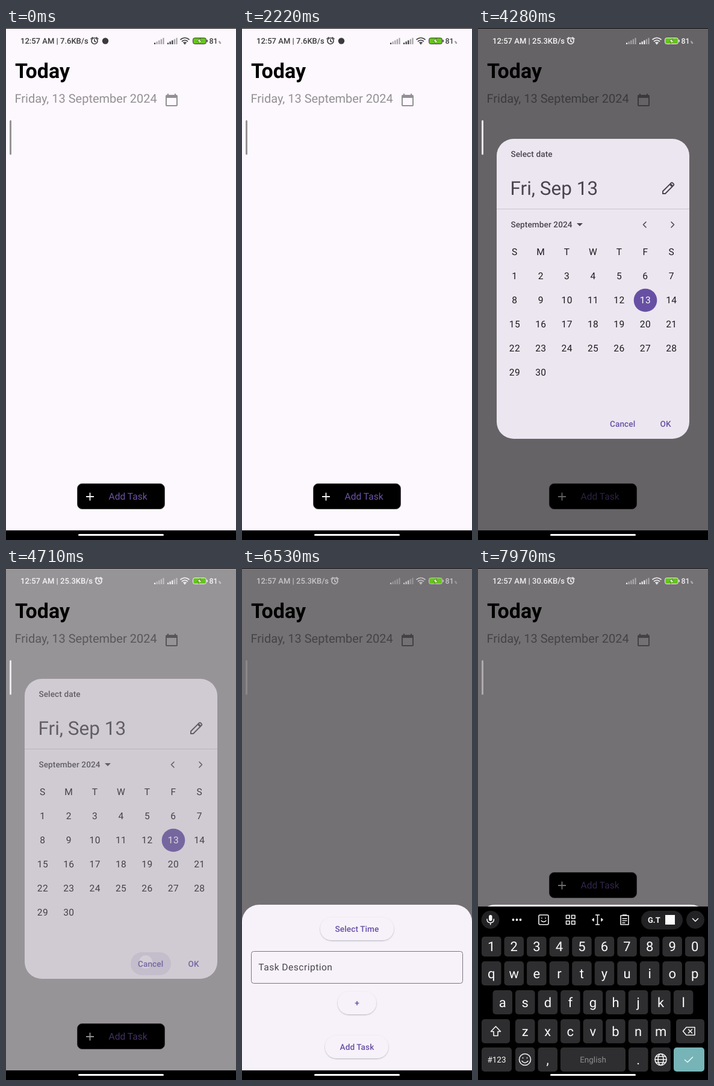
An HTML page for the animation above (8 s loop, 382x850 px).

```html
<!DOCTYPE html>
<html lang="en">
<head>
<meta charset="utf-8">
<title>Task planner</title>
<style>
html, body { margin: 0; width: 100%; height: 100%; overflow: hidden; background: #fdf8fd; }
svg { display: block; width: 382px; height: 850px; font-family: Roboto, sans-serif; text-rendering: geometricPrecision; }
.mid { text-anchor: middle; }
.label { font-size: 13.6px; font-weight: 500; letter-spacing: .1px; }
.line { fill: none; stroke: currentColor; stroke-width: 1.6; stroke-linecap: round; stroke-linejoin: round; }

#status, #edge, #speedA, #speedB, #speedC, #alarm, #dot,
#dialogScrim, #dialog, #press, #tapDate, #tapCancel, #tapAdd,
#sheetScrim, #sheet, #keyboard, #addButton { animation: 8s linear infinite both; }

#status, #edge, #speedA, #speedB, #speedC, #alarm, #dot { animation-timing-function: step-end; }
#status { animation-name: status; }
@keyframes status {
  0% { color: #3b3a3c } 49.5% { color: #f5f4f5 } 60% { color: #3b3a3c }
  77% { color: #c8c5c8 } 96.5%, 100% { color: #efedef }
}
#edge { animation-name: edge; }
@keyframes edge {
  0% { fill: #969298 } 49.5% { fill: #ebe8ec } 60% { fill: #969298 }
  77% { fill: #8b888c } 96.5%, 100% { fill: #aeaab0 }
}
#speedA, #dot { animation-name: speedA; }
@keyframes speedA { 0% { opacity: 1 } 48.125%, 100% { opacity: 0 } }
#speedB { animation-name: speedB; }
@keyframes speedB { 0% { opacity: 0 } 48.125% { opacity: 1 } 98.125%, 100% { opacity: 0 } }
#speedC { animation-name: speedC; }
@keyframes speedC { 0% { opacity: 0 } 98.125%, 100% { opacity: 1 } }
#alarm { animation-name: alarm; }
@keyframes alarm { 0% { transform: none } 48.125%, 100% { transform: translateX(7px) } }

#dialogScrim, #dialog { animation-name: dialog; }
@keyframes dialog {
  0%, 49% { opacity: 0 } 51.5%, 58.1% { opacity: 1 } 58.875% { opacity: .68 } 60.5%, 100% { opacity: 0 }
}
#press { animation-name: press; }
@keyframes press { 0%, 57% { opacity: 0 } 58%, 100% { opacity: .14 } }
#tapDate { animation-name: tapDate; }
@keyframes tapDate { 0%, 45.4% { opacity: 0 } 45.5%, 46.3% { opacity: .6 } 47.2%, 100% { opacity: 0 } }
#tapCancel { animation-name: tapCancel; }
@keyframes tapCancel { 0%, 56.9% { opacity: 0 } 57%, 58.9% { opacity: .55 } 59.8%, 100% { opacity: 0 } }
#tapAdd { animation-name: tapAdd; }
@keyframes tapAdd { 0%, 73.4% { opacity: 0 } 73.5%, 74.6% { opacity: .85 } 75.6%, 100% { opacity: 0 } }

#sheetScrim { animation-name: sheetScrim; }
@keyframes sheetScrim {
  0%, 76.5% { opacity: 0; animation-timing-function: cubic-bezier(.4, 0, .2, 1) }
  80.3%, 100% { opacity: 1 }
}
#sheet { animation-name: sheet; }
@keyframes sheet {
  0%, 76.5% { transform: translateY(292px); animation-timing-function: cubic-bezier(.4, 0, .2, 1) }
  80.3%, 100% { transform: none }
}
#keyboard { animation-name: keyboard; }
@keyframes keyboard {
  0%, 96.5% { transform: translateY(290px); animation-timing-function: cubic-bezier(.35, 0, .4, 1) }
  99.6%, 100% { transform: none }
}
#addButton { animation-name: addButton; }
@keyframes addButton {
  0%, 96.5% { transform: none; animation-timing-function: cubic-bezier(.35, 0, .4, 1) }
  99.6%, 100% { transform: translateY(-251px) }
}
</style>
</head>
<body>
<svg viewBox="0 0 382 850">
  <defs>
    <radialGradient id="tap">
      <stop offset=".5" stop-color="#d3d1d3"/><stop offset="1" stop-color="#868486"/>
    </radialGradient>
    <filter id="lift" x="-10%" y="-10%" width="120%" height="140%">
      <feDropShadow dx="0" dy="1" stdDeviation=".8" flood-opacity=".28"/>
    </filter>
  </defs>
  <rect width="382" height="850" fill="#fdf8fd"/>

  <text x="15" y="83" font-size="34" font-weight="700">Today</text>
  <g fill="#939094">
    <text x="14.500" y="124" font-size="20">Friday, 13 September 2024</text>
    <path transform="translate(263 108)" d="M20 3h-1V1h-2v2H7V1H5v2H4c-1.1 0-2 .9-2 2v15c0 1.100.9 2 2 2h16c1.100 0 2-.9 2-2V5c0-1.100-.9-2-2-2zm0 17H4V8h16z"/>
  </g>
  <circle id="tapDate" cx="272" cy="117" r="13" fill="#ece8ec"/>
  <g id="addButton">
    <rect x="118.500" y="756.500" width="145" height="42" rx="8" stroke="#4c4a4c"/>
    <path d="M133 778h13M139.500 771.500v13" stroke="#f4f2f4" stroke-width="1.800"/>
    <text x="170.500" y="783" font-size="15.570" fill="#6f53a6">Add Task</text>
  </g>
  <circle id="tapAdd" cx="133.500" cy="784" r="11.500" fill="url(#tap)"/>

  <rect id="dialogScrim" width="382" height="834" fill-opacity=".6"/>
  <rect id="sheetScrim" width="382" height="834" fill-opacity=".54"/>
  <rect id="edge" x="6" y="153" width="3" height="57.500" rx="1.500"/>

  <g id="status" fill="currentColor">
    <g font-size="13" font-weight="500">
      <text id="speedA" x="24" y="26">12:57 AM | 7.6KB/s</text>
      <text id="speedB" x="24" y="26">12:57 AM | 25.3KB/s</text>
      <text id="speedC" x="24" y="26">12:57 AM | 30.6KB/s</text>
      <text x="337.500" y="26" font-size="12.500">81</text>
      <text x="353" y="26" font-size="6">%</text>
    </g>
    <g id="alarm" class="line">
      <circle cx="147" cy="21.500" r="5"/>
      <path d="M147 19v3l2 1M141 18l3-2.500M153 18l-3-2.500"/>
    </g>
    <circle id="dot" cx="165" cy="21.500" r="5.200"/>
    <g id="signal"></g>
    <path class="line" d="M290 19q7-5.500 14 0M292.500 22q4.500-3.500 9 0M295 24.500q2-1.500 4 0"/>
    <circle cx="297" cy="26" r="1.300"/>
    <rect x="310.500" y="16.500" width="22" height="10" rx="3" fill="#66c61c" stroke="currentColor"/>
    <rect x="333.500" y="19.500" width="1.500" height="4" rx=".7"/>
    <path d="M323 17l-5.500 5.500h3.500l-1 4 5.500-5.500h-3.500z" fill="#fff" stroke="#46601c" stroke-width=".7"/>
  </g>

  <g id="dialog" fill="#1d1b20" color="#49454f">
    <rect x="31" y="184" width="320" height="498" rx="28" fill="#ece6f0"/>
    <g fill="#49454f">
      <text class="label" x="54.400" y="214">Select date</text>
      <text x="53.500" y="277" font-size="31.500">Fri, Sep 13</text>
      <path d="M307 275v-4l11.500-11.500 4 4-11.500 11.500zM319.500 258.500l1.500-1.500q1-.7 2 0l2 2q.7 1 0 2l-1.500 1.500z" fill="none" stroke="#49454f" stroke-width="1.900"/>
      <text class="label" x="54.400" y="331">September 2024</text>
      <path d="M164 324h10l-5 5z"/>
    </g>
    <path d="M31 300.500h320" stroke="#cac4d0"/>
    <path class="line" d="M279 322l-4.500 4.500 4.500 4.500M321 322l4.500 4.500-4.500 4.500"/>
    <circle cx="278" cy="452" r="19.300" fill="#6750a4"/>
    <g id="days" class="mid" font-size="15.570" letter-spacing=".4"></g>
    <rect id="press" x="207" y="638" width="67" height="38" rx="19" fill="#6750a4"/>
    <circle id="tapCancel" cx="232" cy="654" r="11" fill="#fff"/>
    <g class="label" fill="#6750a4">
      <text x="219" y="662">Cancel</text>
      <text x="302.500" y="662">OK</text>
    </g>
  </g>

  <g id="sheet">
    <path d="M0 834V587a28 28 0 0 1 28-28H354a28 28 0 0 1 28 28V834z" fill="#f7f2fa"/>
    <g fill="#f7f2fa" filter="url(#lift)">
      <rect x="130" y="580" width="122" height="38" rx="19"/>
      <rect x="159" y="703" width="64" height="38" rx="19"/>
      <rect x="138" y="776" width="105" height="38" rx="19"/>
    </g>
    <g class="label mid" fill="#6750a4">
      <text x="191" y="604">Select Time</text>
      <text x="191" y="726.500">+</text>
      <text x="191" y="800">Add Task</text>
    </g>
    <rect x="15.500" y="636.500" width="351" height="53" rx="4" fill="none" stroke="#79747e"/>
    <text x="27.300" y="668" font-size="15.570" letter-spacing=".48" fill="#49454f">Task Description</text>
  </g>

  <rect y="834" width="382" height="16"/>
  <g id="keyboard" fill="#fafafa" color="#f2f2f2">
    <rect y="562" width="382" height="288" fill="#000"/>
    <g id="keys"></g>
    <g fill="#222224">
      <circle cx="20.500" cy="584" r="15"/>
      <rect x="271" y="569" width="69" height="31" rx="15.500"/>
      <circle cx="361" cy="584" r="15"/>
    </g>
    <rect x="18" y="576" width="5.500" height="10" rx="2.700"/>
    <path class="line" d="M15 583q0 6 5.700 6t5.700-6M20.700 589v3"/>
    <g><circle cx="58.500" cy="584" r="1.900"/><circle cx="64.500" cy="584" r="1.900"/><circle cx="70.500" cy="584" r="1.900"/></g>
    <path class="line" d="M103 576h12q2 0 2 2v12q0 2-2 2h-12q-2 0-2-2v-12q0-2 2-2zM106 581v.500M112 581v.500M105 585.500q4 4 8 0M146.500 576.500h5.500v5.500h-5.500zM155.500 576.500h5.500v5.500h-5.500zM146.500 586h5.500v5.500h-5.500zM155.500 586h5.500v5.500h-5.500z"/>
    <path class="line" d="M195.500 576h6M195.500 592h6M198.500 576v16M192 582l-2 2 2 2zM205 582l2 2-2 2zM237 577h13v15h-13zM240.500 576h6M240 582h7M240 585.500h7M240 589h4"/>
    <text x="282" y="589" font-size="13" font-weight="700">G.T</text>
    <rect x="311" y="576" width="16" height="16"/>
    <path class="line" d="M356.500 582l4.500 4.500 4.500-4.500"/>
    <path class="line" d="M29.500 761l-8 8.500h4.500v7h7v-7h4.500zM346 762.500h14v13h-14l-5.500-6.500zM349.500 766l6 6M355.500 766l-6 6"/>
    <g class="line">
      <circle cx="78" cy="816" r="9.500"/>
      <path d="M74.500 813v.800M81.500 813v.800M73 818.500q5 6 10 0M294 816h19M295.500 811h16M295.500 821h16"/>
      <circle cx="303.500" cy="816" r="9.500"/><ellipse cx="303.500" cy="816" rx="4.500" ry="9.500"/>
      <path d="M343.500 816.500l4.500 4 8.500-8.500"/>
    </g>
  </g>
  <rect x="120" y="840" width="142" height="3" rx="1.500" fill="#fff"/>
  <rect width="382" height="1"/>
</svg>
<script>
const svgNS = 'http://www.w3.org/2000/svg';
function add(parent, tag, attrs, text = '') {
  const node = document.createElementNS(svgNS, tag);
  for (const name in attrs) node.setAttribute(name, attrs[name]);
  node.textContent = text;
  return document.getElementById(parent).appendChild(node);
}

[246, 268].forEach((left, group) => {
  for (let i = 0; i < 5; i++) {
    const height = 2.5 + i * 2;
    const opacity = i > group * 2 ? .45 : 1;
    add('signal', 'rect', { x: left + i * 3.6, y: 27 - height, width: 2.2, height, opacity });
  }
});

const columnX = i => 60.9 + i * 43.4;
[...'SMTWTFS'].forEach((day, i) => add('days', 'text', { x: columnX(i), y: 376.5 }, day));
for (let day = 1; day <= 30; day++) {
  const i = day - 1;
  const attrs = { x: columnX(i % 7), y: 416.5 + Math.floor(i / 7) * 40 };
  if (day === 13) attrs.fill = '#fff';
  add('days', 'text', attrs, day);
}

function key(x, y, width, height, text = '', size = 22, style = {}) {
  add('keys', 'rect', { x, y, width, height, rx: 5, fill: style.back || '#2e2e30' });
  add('keys', 'text', {
    x: x + width / 2, y: y + height / 2 + size * .36,
    'font-size': size, class: 'mid', fill: style.ink || '#fafafa'
  }, text);
}
const rows = [['1234567890', 6, 612, 33], ['qwertyuiop', 6, 653, 40], ['asdfghjkl', 24.5, 701, 40], ['zxcvbnm', 62, 749, 40]];
for (const [letters, left, top, height] of rows)
  [...letters].forEach((letter, i) => key(left + i * 37.55, top, 32.5, height, letter));
key(6, 749, 47, 40);
key(329, 749, 47, 40);
key(6, 796, 50, 40, '#123', 13.5);
key(62, 796, 32.5, 40);
key(99.5, 796, 32.5, 40, ',');
key(137, 796, 108, 40, 'English', 13.5, { ink: '#8c8c8e' });
key(250, 796, 32.5, 40, '.');
key(287.5, 796, 32.5, 40);
key(325, 796, 51, 40, '', 13, { back: '#76b4b8' });
</script>
</body>
</html>
```
